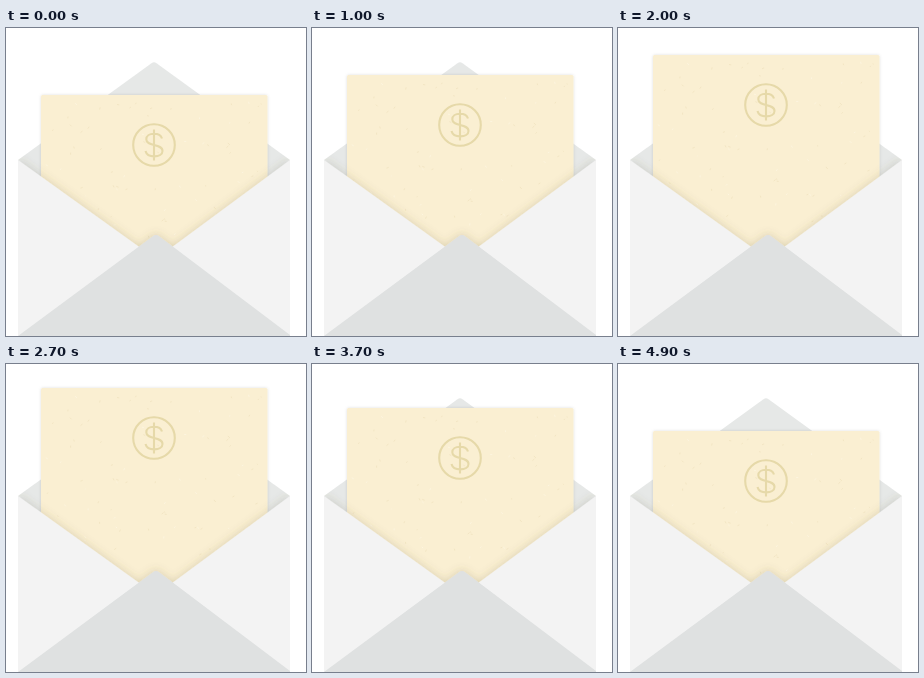
Recreate the animation shown at these times as an HTML page. Size 300 px wide and 308 px high, loop 5400 ms.

```html
<!DOCTYPE html>
<html lang="en">
<head>
<meta charset="utf-8">
<title>Letter in an envelope</title>
<style>
  html, body { margin: 0; width: 100%; height: 100%; overflow: hidden; background: #fff; }
  svg { display: block; width: 100vw; height: 100vh; }
</style>
</head>
<body>
<svg viewBox="0 0 300 308" preserveAspectRatio="none">
  <defs>
    <clipPath id="inside">
      <path d="M12 132 L148 34 L284 132 V308 H12 Z"/>
    </clipPath>
    <filter id="cardShade" x="-10%" y="-10%" width="120%" height="120%">
      <feDropShadow dx="0" dy="0" stdDeviation="1.8" flood-color="#000" flood-opacity=".13"/>
    </filter>
    <filter id="flapShade" x="-10%" y="-10%" width="120%" height="120%">
      <feDropShadow dx="0" dy="-1" stdDeviation="4" flood-color="#6b5f3c" flood-opacity=".2"/>
    </filter>
  </defs>

  <path fill="#e6e8e7" d="M12 132 L145.5 35.2 Q148 33.4 150.5 35.2 L284 132 V308 H12 Z"/>

  <g id="card">
    <rect x="35" width="226.5" height="196" rx="1.5" fill="#faefd2" filter="url(#cardShade)"/>
    <g id="grain" fill="none" stroke-linecap="round"></g>
    <g fill="none" stroke="#e6d9a9" stroke-width="2.1">
      <circle cx="148" cy="50" r="20.8"/>
      <path d="M148 34.5 V65.5 M156 43.5 C155 40.2 152 38.8 148 38.8 C143.2 38.8 140.3 41 140.3 44.2 C140.3 48 143.8 49 148 50 C152.6 51.1 156.5 52.2 156.5 56 C156.5 59.3 153 61.4 148.3 61.4 C143.6 61.4 140.4 59.6 139.5 56"/>
    </g>
  </g>

  <g clip-path="url(#inside)">
    <g filter="url(#flapShade)">
      <path fill="#f3f3f3" d="M12 132 L150 231 L284 132 V308 H12 Z"/>
      <path fill="#dfe1e1" d="M12 308 L146.5 208.4 Q150 205.6 153.5 208.4 L284 307 V308 Z"/>
    </g>
  </g>
</svg>
<script>
  const LOOP = 5400, STEP = 100;
  const LOW = 67, RISE = 22, FALL_AT = 27;
  const card = document.getElementById('card');
  const grain = document.getElementById('grain');

  let seed = 41;
  const random = () => (seed = seed * 16807 % 2147483647) / 2147483647;

  // Faint paper fibres
  for (let i = 0; i < 90; i++) {
    const x = 40 + random() * 216, y = 5 + random() * 165;
    const fibre = document.createElementNS('http://www.w3.org/2000/svg', 'path');
    fibre.setAttribute('d', `M${x} ${y} l${random() * 3 - 1.5} ${random() * 3 - 1.5}`);
    fibre.setAttribute('stroke', i % 3 ? '#f3e6c4' : '#fdf5df');
    grain.append(fibre);
  }

  function cardTop(time) {
    const k = Math.floor(time % LOOP / STEP);
    if (k < FALL_AT) return LOW - 2 * Math.min(k, RISE);
    return Math.min(LOW, LOW - 2 * RISE + 1 + 2 * (k - FALL_AT));
  }

  function draw() {
    card.setAttribute('transform', `translate(0 ${cardTop(performance.now())})`);
    requestAnimationFrame(draw);
  }
  draw();
</script>
</body>
</html>
```
